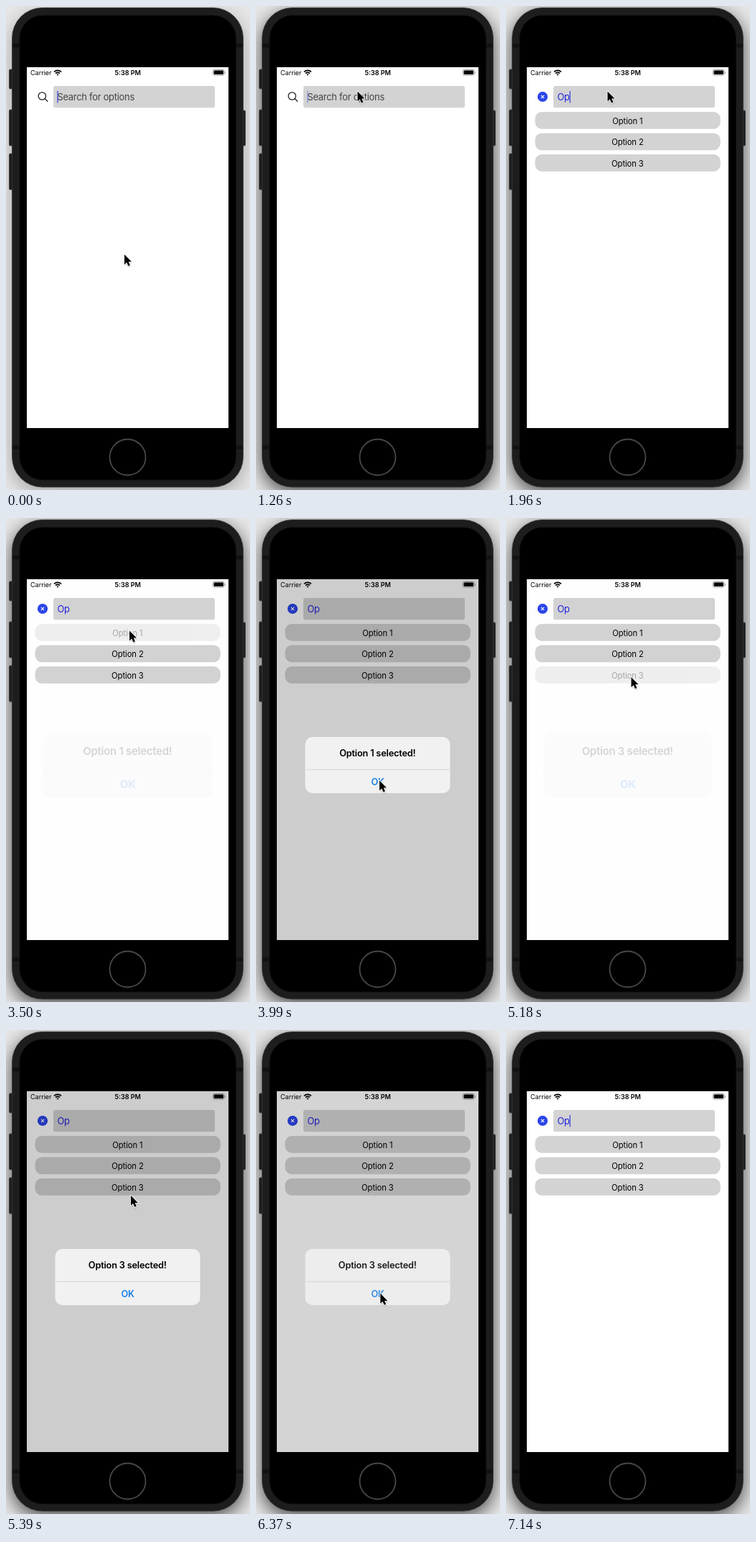
An HTML page that plays this animation: 340 by 672 pixels, repeating every 7420 ms.

```html
<!DOCTYPE html>
<html lang="en">
<head>
<meta charset="utf-8">
<title>Search options</title>
<style>
  html, body { margin: 0; width: 100%; height: 100%; overflow: hidden; background: #e6e6e6; }
  svg { display: block; width: 100vw; height: 100vh; }
  text { font-family: Inter, "Open Sans", sans-serif; }
  .status { font-size: 9px; }
  .field { font-size: 12.9px; letter-spacing: -.25px; }
  .option text { font-size: 11.25px; letter-spacing: -.1px; text-anchor: middle; }
  .alert text { font-size: 12.75px; font-weight: 600; letter-spacing: -.2px; text-anchor: middle; }
</style>
</head>
<body>
<svg viewBox="0 0 340 672">
  <defs>
    <filter id="blur" x="-30%" y="-30%" width="160%" height="160%"><feGaussianBlur stdDeviation="13"/></filter>
    <filter id="soft" x="-60%" y="-60%" width="220%" height="220%"><feGaussianBlur stdDeviation=".9"/></filter>
    <clipPath id="screen"><rect x="29" y="85" width="281" height="501"/></clipPath>
    <path id="arrow" d="M0 0V14L3.2 11.1L5.4 16L7.9 15L5.8 10.1H10Z"/>
  </defs>

  <rect width="340" height="672" fill="#e6e6e6"/>
  <rect id="shadow" x="8" y="10" width="323" height="666" rx="42" filter="url(#blur)"/>

  <!-- phone -->
  <g fill="#1d1d1d" stroke="#3a3a3a" stroke-width=".8">
    <rect x="4.5" y="88" width="6" height="27" rx="1.5"/>
    <rect x="4.5" y="144" width="6" height="50" rx="1.5"/>
    <rect x="4.5" y="205" width="6" height="50" rx="1.5"/>
    <rect x="328" y="145" width="5.5" height="49" rx="1.5"/>
    <rect x="8.5" y="2.5" width="322" height="665.5" rx="42"/>
  </g>
  <path d="M9 55h9M321 55h9M9 613h9M321 613h9" stroke="#111" stroke-width="5"/>
  <rect x="19" y="13" width="301.5" height="645" rx="32" stroke="#0e0e0e"/>
  <circle cx="169.5" cy="626.5" r="25" stroke="#484848" stroke-width="1.8"/>

  <g clip-path="url(#screen)">
    <rect x="29" y="85" width="281" height="501" fill="#fff"/>
    <text class="status" x="34" y="96">Carrier</text>
    <text class="status" x="169.7" y="96" font-weight="600" text-anchor="middle">5:38 PM</text>
    <path d="M67 91.4Q72 87.2 77 91.4M69 93.5Q72 91.1 75 93.5" fill="none" stroke="#000" stroke-width="1.7"/>
    <path d="M70.4 95L72 96.8L73.6 95Q72 93.8 70.4 95Z"/>
    <rect x="288.4" y="88.4" width="15.8" height="7.8" rx="2" fill="none" stroke="#888" stroke-width=".8"/>
    <rect x="289.6" y="89.6" width="13.4" height="5.4" rx="1.1"/>
    <path d="M305.3 91v2.6" stroke="#999"/>

    <rect x="66" y="111" width="225" height="30.2" rx="3" fill="#d3d3d3"/>
    <g id="lens" fill="none" stroke="#222" stroke-width="1.3" stroke-linecap="round">
      <circle cx="50.3" cy="125" r="5.2"/><path d="M54.2 128.8L57.8 132.3"/>
    </g>
    <g id="clear">
      <circle cx="51" cy="126" r="7.1" fill="#2b45ea"/>
      <path d="M48.9 123.9l4.2 4.2m0-4.2l-4.2 4.2" stroke="#fff" stroke-width="1.1"/>
    </g>
    <text id="query" class="field" x="71.4" y="130.9"></text>
    <rect id="caret" y="118" width="1.4" height="16.5" fill="#4552d8"/>
    <g id="options"></g>

    <rect id="dim" x="29" y="85" width="281" height="501"/>
    <g id="alert" class="alert">
      <rect x="68.5" y="304" width="202" height="78" rx="10" fill="#f1f1f1"/>
      <path d="M68.5 349.3h202" stroke="#cecece" stroke-width=".8"/>
      <text id="message" x="169.3" y="331.2"></text>
      <text x="169.7" y="370.7" fill="#177fe6">OK</text>
    </g>
  </g>

  <g id="cursor">
    <use href="#arrow" x=".5" y="1.5" opacity=".4" filter="url(#soft)"/>
    <use href="#arrow" stroke="#fff" stroke-width="1.8" stroke-linejoin="round"/>
    <use href="#arrow"/>
  </g>
</svg>

<script>
  const LOOP = 7420, STEP = 70;
  const ACTIVATE = 1260, TYPE = 1540, TYPED = 1960, LEAVE = 7140;
  const REFOCUS = 490, BLINK = 910, CARET_OFF = 630;

  const alerts = [
    { option: 1, open: 3500, close: 4340 },
    { option: 3, open: 5180, close: 6370 }
  ];
  const home = { x: 165, y: 345 };
  const moves = [
    { start: 0, end: 140, x: 165, y: 275 },
    { start: 280, end: 560, x: 157, y: 140 },
    { start: 630, end: 910, x: 141.5, y: 118.5 },
    { start: 2660, end: 3080, x: 172, y: 156.5 },
    { start: 3570, end: 3990, x: 172, y: 364.5 },
    { start: 4480, end: 4900, x: 174.5, y: 221 },
    { start: 5320, end: 5810, x: 164, y: 380 },
    { start: 5810, end: 6020, x: 173.3, y: 365.8 },
    { start: 6580, end: 7070, x: 174.5, y: 662 }
  ];

  const $ = id => document.getElementById(id);
  const set = (el, name, value) => el.setAttribute(name, value);
  const show = (el, opacity) => set(el, 'opacity', +opacity);
  const clamp = k => Math.min(1, Math.max(0, k));
  const smooth = k => k * k * (3 - 2 * k);
  const ramp = (t, start, duration) => smooth(clamp((t - start) / duration));

  $('options').innerHTML = [1, 2, 3].map((n, i) => {
    const y = 147 + i * 29.5;
    return `<g class="option"><rect x="40.5" y="${y}" width="258.3" height="23.7" rx="9.5" fill="#d3d3d3"/>` +
      `<text x="169.4" y="${y + 16.5}">Option ${n}</text></g>`;
  }).join('');
  const optionEls = [...document.querySelectorAll('.option')];

  // The blink restarts on typing and whenever the field regains focus.
  function caretOpacity(t) {
    if (alerts.some(a => t >= a.open && t < a.close + REFOCUS)) return 0;
    const starts = [TYPE - BLINK * 2 + 70, TYPED, ...alerts.map(a => a.close + REFOCUS)];
    if (t < TYPE) return clamp((CARET_OFF - (t - starts[0]) % BLINK) / 140);
    if (t < TYPED) return 1;
    const since = t - Math.max(...starts.filter(s => s <= t));
    return clamp((CARET_OFF - since % BLINK) / 140);
  }

  function drawField(t) {
    const typed = t < TYPE ? '' : t < TYPE + 280 ? 'O' : 'Op';
    $('query').textContent = typed || 'Search for options';
    set($('query'), 'fill', typed ? '#2222e0' : '#444');
    set($('caret'), 'x', 71.3 + typed.length * 8.6);
    show($('caret'), caretOpacity(t));
    show($('lens'), !typed);
    show($('clear'), typed !== '');
    show($('options'), t > TYPE);
  }

  // A pressed option dips quickly and recovers slowly.
  function pressOpacity(age) {
    return 1 - .88 * clamp(Math.min(age / 70, 1 - (age - 70) / 280));
  }

  function drawAlert(t) {
    const current = alerts.find(a => t < a.close + 280) || alerts[1];
    const opened = ramp(t, current.open - 70, 280);
    const remaining = 1 - ramp(t, current.close - 70, 300);
    optionEls.forEach((el, i) =>
      show(el, i + 1 === current.option ? pressOpacity(t - current.open + 140) : 1));
    $('message').textContent = `Option ${current.option} selected!`;
    show($('alert'), opened * remaining);
    show($('dim'), .196 * opened ** 2 * remaining);
    set($('alert'), 'transform', `translate(169.5 343) scale(${1.2 - .2 * opened}) translate(-169.5 -343)`);
  }

  function drawCursor(t) {
    let { x, y } = home;
    for (const move of moves) {
      const k = ramp(t, move.start, move.end - move.start);
      x += (move.x - x) * k;
      y += (move.y - y) * k;
    }
    set($('cursor'), 'transform', `translate(${x} ${y})`);
    show($('cursor'), t < LEAVE);
  }

  function draw(now) {
    const t = Math.floor(now % LOOP / STEP) * STEP;
    show($('shadow'), t < ACTIVATE ? .28 : .68);
    drawField(t);
    drawAlert(t);
    drawCursor(t);
  }

  const start = performance.now();
  function tick() {
    draw(performance.now() - start);
    requestAnimationFrame(tick);
  }
  tick();
</script>
</body>
</html>
```
